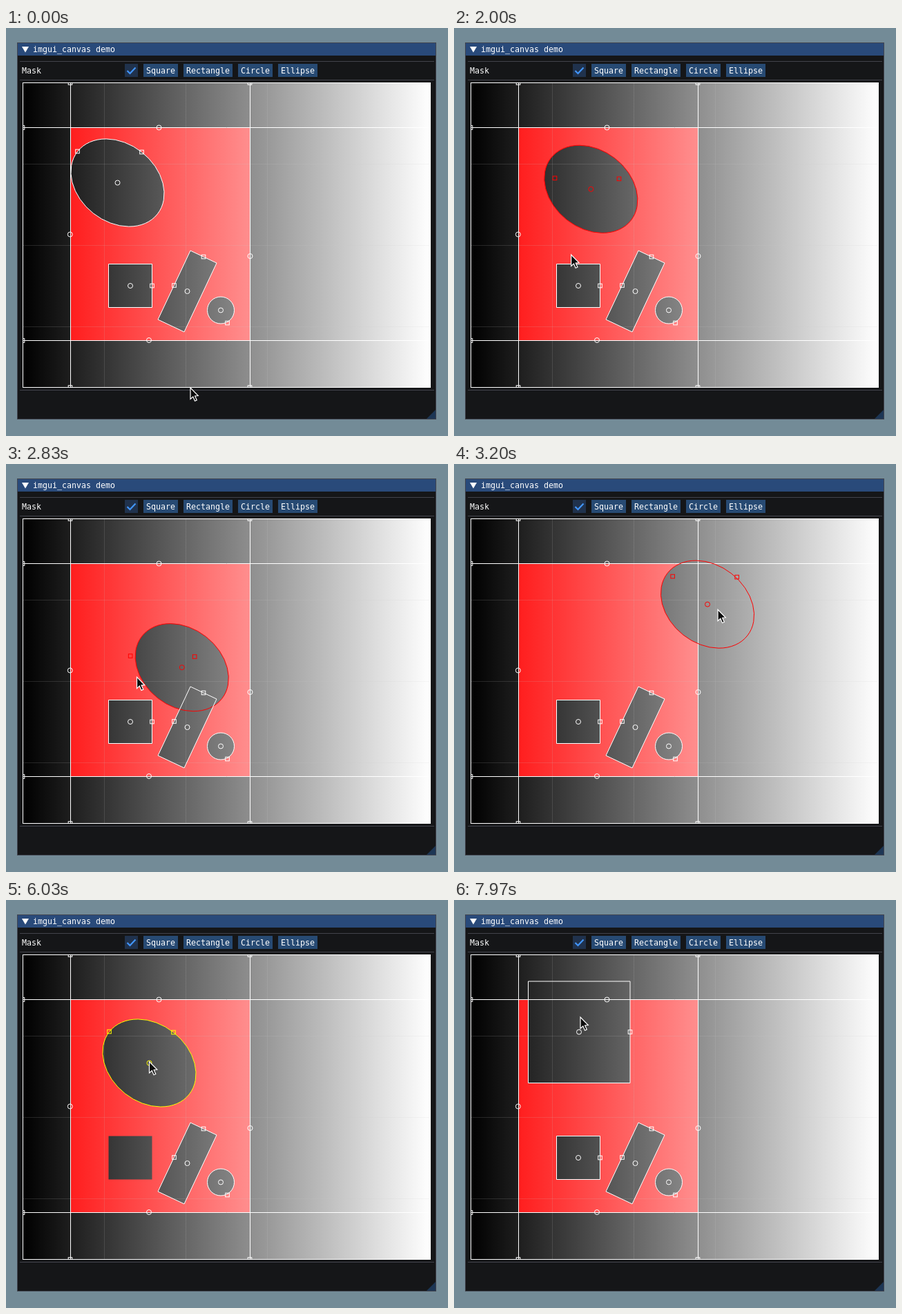
Animation, 640 px wide and 592 px high, one loop 8000 ms. Source, as an HTML page with a canvas:

```html
<!DOCTYPE html>
<html lang="en">
<head>
<meta charset="utf-8">
<title>Canvas mask demo</title>
<style>
  html, body { margin: 0; width: 100%; height: 100%; overflow: hidden; background: #738b97; }
  canvas { display: block; }
</style>
</head>
<body>
<canvas id="stage" width="640" height="592"></canvas>
<script>
const ctx = document.getElementById('stage').getContext('2d');
const LOOP = 8000;
const WHITE = '#fff', YELLOW = '#ff0', RED = '#f00';
const AREA = { x: 24, y: 80, w: 591, h: 441 };
const GUIDE = { left: 93.5, right: 353.5, top: 144.5, bottom: 453.5 };

// Keys are [time, x, y]; curves are smooth, with flat slopes at extremes and rests.
const dragKeys = [
  [1900, 161.5, 224.5], [2000, 198, 233.5], [2033, 204, 262.5], [2120, 170, 331],
  [2190, 146, 298], [2270, 162, 232], [2340, 205, 206], [2420, 252, 228],
  [2480, 260, 272], [2530, 222, 308.5], [2563, 198.5, 320], [2600, 170, 300],
  [2650, 183, 252], [2720, 222, 215], [2800, 262, 262], [2870, 235, 325],
  [2940, 190, 320], [3000, 192, 250], [3060, 240, 208], [3130, 320, 195],
  [3200, 366.5, 203.5], [3233, 374.5, 208.5], [3320, 382, 213], [3380, 368, 240],
  [3460, 325, 290], [3540, 275, 325], [3610, 222, 338], [3700, 172, 305],
  [3790, 172, 250], [3900, 200, 230], [4050, 207.5, 236.5]
];
const approachKeys = [
  [30, 267, 522], [250, 245, 440], [550, 190, 270], [830, 165.5, 215],
  [900, 165.5, 215], [930, 165, 217], [1130, 165, 217], [1200, 163, 219],
  [1400, 163, 219], [1500, 205, 235], [1620, 218, 290], [1730, 190, 324],
  [1900, 190, 324], [2000, 170, 329]
];
const buttonKeys = [
  [6630, 207.5, 234.5], [7000, 222, 150], [7370, 246, 62], [7720, 246, 62], [7970, 183, 170]
];

function slope(keys, i, axis) {
  const a = keys[i - 1], b = keys[i], c = keys[i + 1];
  if (!a || !c || (b[axis] - a[axis]) * (c[axis] - b[axis]) <= 0) return 0;
  return (c[axis] - a[axis]) / (c[0] - a[0]);
}

function track(keys, t) {
  const last = keys.length - 1;
  if (t <= keys[0][0]) return keys[0].slice(1);
  if (t >= keys[last][0]) return keys[last].slice(1);
  let i = 0;
  while (t >= keys[i + 1][0]) i++;
  const a = keys[i], b = keys[i + 1], d = b[0] - a[0], u = (t - a[0]) / d, v = 1 - u;
  return [1, 2].map(k =>
    v * v * (1 + 2 * u) * a[k] + u * v * v * d * slope(keys, i, k) +
    u * u * (3 - 2 * u) * b[k] - u * u * v * d * slope(keys, i + 1, k));
}

function cursorAt(t) {
  if (t < 2000) return track(approachKeys, t);
  if (t >= 6630) return track(buttonKeys, t);
  const [x, y] = track(dragKeys, t + 120);
  return [x, y - 2];
}

function polygon(points) {
  const p = new Path2D();
  points.forEach(([x, y]) => p.lineTo(x, y));
  p.closePath();
  return p;
}

function box(x, y, w, h) {
  const p = new Path2D();
  p.rect(x, y, w, h);
  return p;
}

function oval(x, y, rx, ry = rx, turn = 0) {
  const p = new Path2D();
  p.ellipse(x, y, rx, ry, turn, 0, 2 * Math.PI);
  return p;
}

const square = { path: box(148.5, 342.5, 63, 63), center: [180, 374], knobs: [[211.5, 374]] };
const fixedShapes = [
  { path: polygon([[267, 323], [305, 341], [258, 441], [220, 423]]),
    center: [262.5, 382], knobs: [[286, 332], [243.5, 373.5]] },
  { path: oval(311, 409.5, 19.5), center: [311, 409.5], knobs: [[320.5, 428]] }
];
const newSquare = { path: box(107.5, 118, 147.5, 147.5), center: [181, 191.5], knobs: [[255, 191.5]] };
const arrow = polygon([[0, 0], [0, 16.5], [3.8, 13], [6.5, 19.3], [9.3, 18], [6.6, 12], [11.3, 11.6]]);

function ellipseShape(t) {
  const [x, y] = track(dragKeys, t);
  const [kx, ky] = track(dragKeys, t < 1900 ? t : t + 33);
  const dragging = t >= 1430 && t < 4170;
  return {
    path: oval(x, y, 73.5, 56.6, 0.665), center: [x, y],
    knobs: [[kx - 58, ky - 45.5], [kx + 35, ky - 44.5]],
    color: dragging ? RED : t >= 790 ? YELLOW : WHITE
  };
}

function fill(x, y, w, h, color) {
  ctx.fillStyle = color;
  ctx.fillRect(x, y, w, h);
}

function line(x1, y1, x2, y2, color) {
  ctx.strokeStyle = color;
  ctx.beginPath();
  ctx.moveTo(x1, y1);
  ctx.lineTo(x2, y2);
  ctx.stroke();
}

function label(text, x, y) {
  ctx.fillStyle = WHITE;
  ctx.fillText(text, x, y);
}

function ring(x, y) {
  ctx.stroke(oval(x, y, 3.5));
}

function knob(x, y) {
  ctx.strokeRect(x - 2.8, y - 2.8, 5.6, 5.6);
}

function outline(shape) {
  ctx.strokeStyle = shape.color || WHITE;
  ctx.stroke(shape.path);
  ring(...shape.center);
  shape.knobs.forEach(k => knob(...k));
}

const ramp = ctx.createLinearGradient(AREA.x, 0, AREA.x + AREA.w, 0);
ramp.addColorStop(0, '#000');
ramp.addColorStop(1, '#fff');

function drawButton(text, x, [mx, my], pressed) {
  const w = text.length * 7 + 8;
  const hover = mx >= x && mx < x + w && my >= 52 && my < 71;
  fill(x, 52, w, 19, hover ? (pressed ? '#0f87fa' : '#4296fa') : '#274a73');
  label(text, x + 4, 66);
}

function drawWindow(t, mouse) {
  fill(0, 0, 640, 592, '#738b97');
  fill(16, 21, 607, 547, '#151618');
  fill(16, 21, 607, 19, '#294a7a');
  ctx.strokeStyle = '#42454f';
  ctx.strokeRect(16.5, 21.5, 606, 546);
  ctx.fillStyle = '#1d3655';
  ctx.fill(polygon([[622, 554], [622, 567], [609, 567]]));
  ctx.fillStyle = WHITE;
  ctx.fill(polygon([[23, 27], [33, 27], [28, 35.5]]));
  [48.5, 75.5, 525.5].forEach(y => line(20, y, 620, y, '#42434b'));

  ctx.font = '11.63px "DejaVu Sans Mono", monospace';
  label('imgui_canvas demo', 39, 35);
  label('Mask', 23, 66);
  fill(172, 52, 19, 19, '#20324d');
  ctx.strokeStyle = '#4296fa';
  ctx.lineWidth = 2.2;
  ctx.beginPath();
  ctx.moveTo(175.5, 62);
  ctx.lineTo(179.5, 66);
  ctx.lineTo(187.5, 57.5);
  ctx.stroke();
  ctx.lineWidth = 1;

  const pressed = t >= 7530 && t < 7610;
  drawButton('Square', 199, mouse, pressed);
  drawButton('Rectangle', 257, mouse, pressed);
  drawButton('Circle', 336, mouse, pressed);
  drawButton('Ellipse', 394, mouse, pressed);
}

function drawMask(holes) {
  fill(AREA.x, AREA.y, AREA.w, AREA.h, ramp);
  ctx.globalCompositeOperation = 'lighter';
  fill(93, 145, 261, 309, RED);
  ctx.globalCompositeOperation = 'source-over';
  ctx.fillStyle = ramp;
  holes.forEach(s => ctx.fill(s.path));
  const faint = 'rgba(200,200,200,.16)';
  for (let i = 1; i < 5; i++) {
    const x = Math.floor(24.5 + 118 * i) + 0.5, y = 79.5 + 118 * i;
    line(x, 80, x, 521, faint);
    if (i < 4) line(24, y, 615, y, faint);
  }
}

function drawGuides() {
  const { left, right, top, bottom } = GUIDE;
  [left - 0.5, right].forEach(x => {
    const px = Math.floor(x) + 0.5;
    line(px, 80, px, 521, WHITE);
    knob(px - 0.5, 79.5);
    knob(px - 0.5, 521.5);
  });
  [top, bottom].forEach(y => {
    line(24, y, 615, y, WHITE);
    knob(24, y);
    knob(615, y);
  });
  ring(221.5, top);
  ring(207, 453);
  ring(92.8, 299.5);
  ring(right, 331);
}

function drawCursor(x, y) {
  ctx.save();
  ctx.translate(x, y);
  ctx.fillStyle = '#0c0c0c';
  ctx.strokeStyle = WHITE;
  ctx.lineWidth = 1.2;
  ctx.fill(arrow);
  ctx.stroke(arrow);
  ctx.restore();
}

function draw(t) {
  const mouse = cursorAt(t);
  const ellipse = ellipseShape(t);
  const holes = [square, ...fixedShapes];
  const outlines = [...fixedShapes];
  if (t < 6170) holes.push(ellipse);
  if (t < 6070) outlines.unshift(ellipse);
  if (t < 6030 || t >= 6070) outlines.push(square);
  if (t >= 7640) outlines.push(newSquare);
  if (t >= 7700) holes.push(newSquare);

  ctx.lineWidth = 1;
  drawWindow(t, mouse);
  ctx.save();
  ctx.beginPath();
  ctx.rect(24, 79, 591, 443);
  ctx.clip();
  drawMask(holes);
  drawGuides();
  outlines.forEach(outline);
  ctx.strokeStyle = WHITE;
  ctx.strokeRect(24.5, 79.5, 590, 442);
  ctx.restore();
  drawCursor(...mouse);
}

const start = performance.now();
function tick() {
  draw((performance.now() - start) % LOOP);
  requestAnimationFrame(tick);
}
tick();
</script>
</body>
</html>
```
